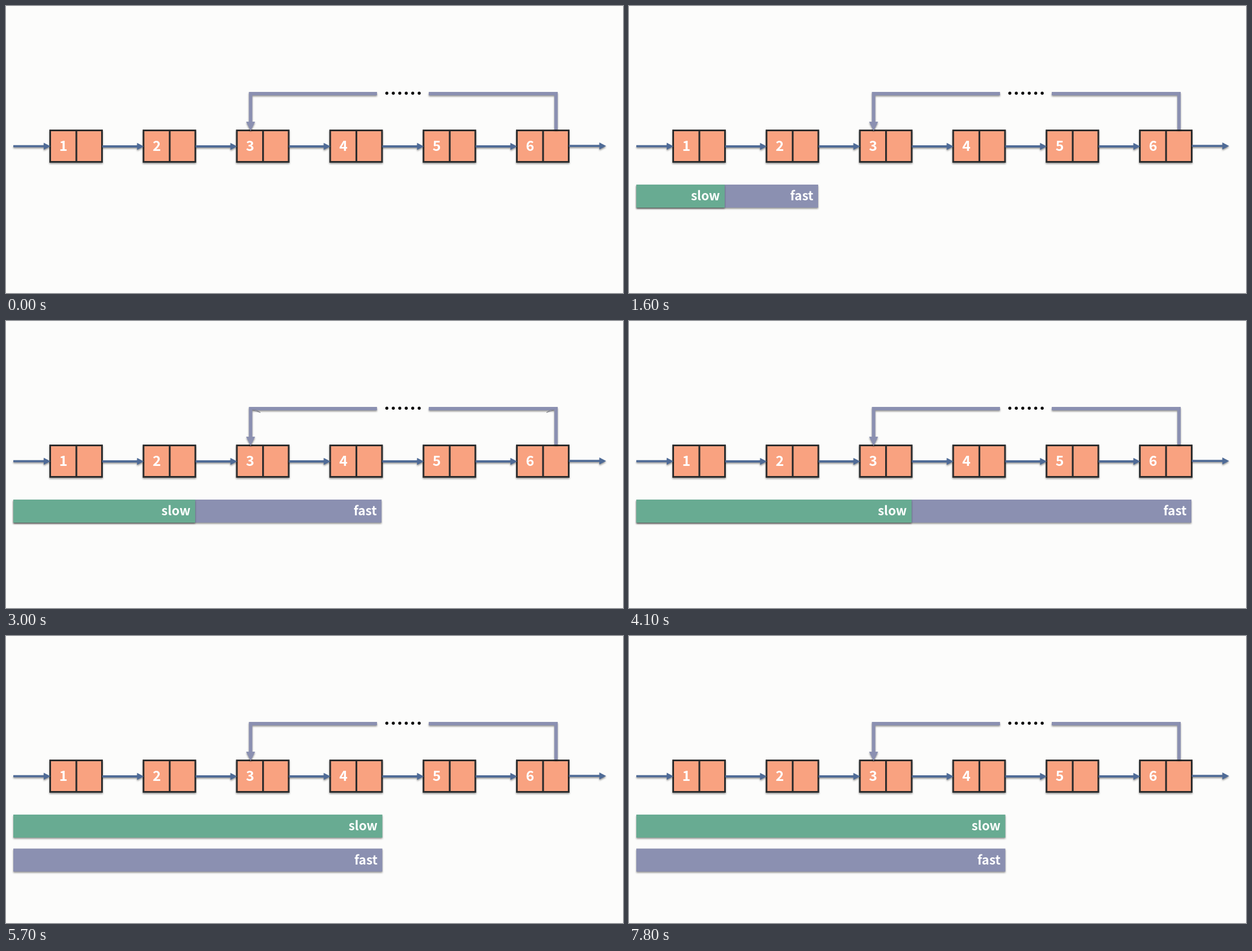
These frames come from a looping animation (1096 px wide and 511 px high, 8200 ms). An HTML page:

```html
<!DOCTYPE html>
<html lang="en">
<head>
<meta charset="utf-8">
<title>Slow and fast pointers</title>
<style>
  html, body { margin: 0; width: 100%; height: 100%; overflow: hidden; background: #fcfcfb; }
  svg { display: block; width: 1096px; height: 511px; }
  text { font-family: "Noto Sans CJK SC", "Noto Sans CJK JP", "Noto Sans CJK", "Noto Sans", sans-serif; font-weight: 700; fill: #fff; }
  .shade { filter: drop-shadow(0 2.5px 1.5px rgba(0, 0, 0, .42)); }
  .node rect { fill: #f9a280; stroke: #2b2c2d; stroke-width: 3; }
  .node path { stroke: #2b2c2d; stroke-width: 3.2; }
  .node text { font-size: 25px; text-anchor: middle; }
  .arrow line { stroke: #4f6b97; stroke-width: 3.8; }
  .arrow path { fill: #4f6b97; }
  .loop { fill: none; stroke: #8b90b1; stroke-width: 6; }
  .loop-head { fill: #8b90b1; }
  .folds { fill: #a9abbd; stroke: #77787f; stroke-width: .8; }
  .bar text { font-size: 22.5px; text-anchor: end; }
  #slow rect { fill: #68ab92; }
  #fast rect { fill: #8b90b1; }
</style>
</head>
<body>
<svg viewBox="0 0 1096 511">
  <g id="nodes" class="shade"></g>
  <g id="arrows" class="shade"></g>
  <g class="shade">
    <path class="loop" d="M659 156H434.5V208M751 156H977V220"/>
    <path class="loop-head" d="M426.5 206H442.5L434.5 222.5Z"/>
  </g>
  <path id="folds" class="folds" d="M437.5 158.5H444L452 163ZM973.5 158.5H967L960 163Z"/>
  <g id="dots"></g>
  <g id="bars">
    <g id="fast" class="bar">
      <rect class="shade" x="13" y="318" height="41"/><text y="346">fast</text>
    </g>
    <g id="slow" class="bar">
      <rect class="shade" x="13" y="318" height="41"/><text y="346">slow</text>
    </g>
  </g>
</svg>
<script>
  const LOOP = 8200, STEP = 100, MOVE = 800, PITCH = 165.8;
  const $ = id => document.getElementById(id);

  const arrow = (x1, x2, y) =>
    `<g class="arrow"><line x1="${x1}" y1="${y}" x2="${x2 - 10}" y2="${y}"/>` +
    `<path d="M${x2 - 12} ${y - 6.2}L${x2} ${y}L${x2 - 12} ${y + 6.2}Z"/></g>`;

  let nodes = "", dots = "", arrows = arrow(13, 79, 249.7);
  for (let i = 0; i < 6; i++) {
    const x = i * PITCH;
    nodes += `<g class="node" transform="translate(${x} 0)">` +
      `<rect x="78.5" y="221.5" width="92" height="56"/>` +
      `<path d="M125 221V278"/><text x="102" y="258">${i + 1}</text></g>`;
    arrows += i < 5 ? arrow(171 + x, 79 + x + PITCH, 250) : arrow(1000, 1066, 249.2);
    dots += `<circle cx="${676.5 + i * 11.5}" cy="155.3" r="2.7"/>`;
  }
  $("nodes").innerHTML = nodes;
  $("arrows").innerHTML = arrows;
  $("dots").innerHTML = dots;

  // Right edges of both bars and the drop of the fast bar
  const poses = [
    { slow: 170, fast: 336, drop: 0 },
    { slow: 336, fast: 667, drop: 0 },
    { slow: 502, fast: 999, drop: 0 },
    { slow: 668.5, fast: 668.5, drop: 60.5 }
  ];
  const starts = [1610, 2990, 4710];

  const ease = (t, start) => {
    const p = Math.min(1, Math.max(0, (t - start) / MOVE));
    return (1 - Math.cos(Math.PI * p)) / 2;
  };

  function poseAt(t) {
    const pose = { ...poses[0] };
    starts.forEach((start, i) => {
      const p = ease(t, start);
      for (const key in pose) pose[key] += (poses[i + 1][key] - poses[i][key]) * p;
    });
    return pose;
  }

  function setBar(id, right, drop) {
    const [rect, label] = $(id).children;
    rect.setAttribute("width", right - 13);
    label.setAttribute("x", right - 8.5);
    $(id).setAttribute("transform", `translate(0 ${drop})`);
  }

  function draw(t) {
    const pose = poseAt(t);
    setBar("slow", pose.slow, 0);
    setBar("fast", pose.fast, pose.drop);
    $("bars").setAttribute("opacity", ease(t, 0));
    const moving = starts.some(s => t >= s && t < s + MOVE);
    $("folds").setAttribute("visibility", moving ? "visible" : "hidden");
  }

  const begin = performance.now();
  function tick() {
    const t = (performance.now() - begin) % LOOP;
    draw(Math.floor(t / STEP) * STEP);
    requestAnimationFrame(tick);
  }
  tick();
</script>
</body>
</html>
```
